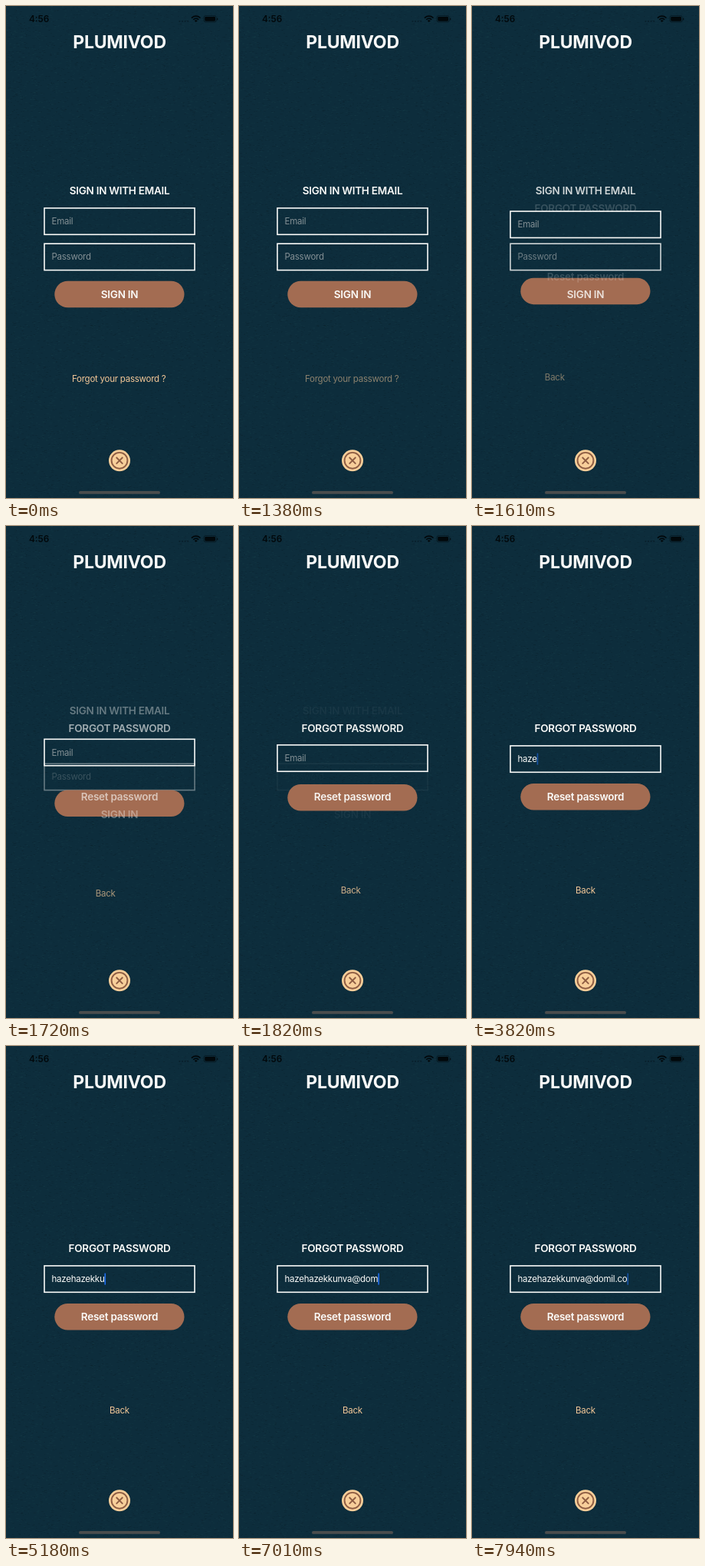
These frames come from a looping animation (296 px wide and 640 px high, 8 s). An HTML page with a canvas:

```html
<!DOCTYPE html>
<html lang="en">
<head>
<meta charset="utf-8">
<title>Password reset</title>
<style>
  html, body { margin: 0; width: 100%; height: 100%; overflow: hidden; background: #0d2d3c; }
  canvas { display: block; width: 100vw; height: 100vh; }
</style>
</head>
<body>
<canvas id="stage"></canvas>
<script>
const W = 296, H = 640, LOOP = 8000;
const canvas = document.getElementById('stage');
const dpr = window.devicePixelRatio || 1;
canvas.width = W * dpr;
canvas.height = H * dpr;
const ctx = canvas.getContext('2d');

const WHITE = '#fbfbf9', GREY = '#849095', PEACH = '#f3c797', BROWN = '#a36c52';
const BODY = { size: 11.5, weight: 400, spacing: -0.25, align: 'left' };
const LABEL = { size: 13.5, weight: 600, spacing: -0.27, align: 'center' };
const TITLE = { size: 23, weight: 700, spacing: -0.2, align: 'center' };
const CLOCK = { size: 11.8, weight: 600, spacing: 0, align: 'left' };

const EMAIL = 'hazehazekkunva@domil.co';
// Moment each character appears.
const KEYS = [3320, 3530, 3680, 3820, 4140, 4290, 4570, 4570, 4900, 5050, 5180, 5330,
  5520, 5740, 6250, 6480, 6760, 7010, 7180, 7370, 7570, 7790, 7940];
// The screen refreshes at these moments while the form changes.
const STEPS = [0, 1380, 1490, 1610, 1720, 1820, 1940];
const FOCUS = 2510;

const background = makeBackground();

function makeBackground() {
  const layer = document.createElement('canvas');
  layer.width = W;
  layer.height = H;
  const g = layer.getContext('2d');
  g.fillStyle = '#0d2d3c';
  g.fillRect(0, 0, W, H);
  let seed = 7;
  const random = () => (seed = (seed * 16807) % 2147483647) / 2147483647;
  for (let i = 0; i < 14000; i++) {
    g.fillStyle = random() < 0.5 ? 'rgba(0,10,18,.1)' : 'rgba(70,110,125,.05)';
    g.fillRect(Math.floor(random() * W), Math.floor(random() * H), 1 + Math.floor(random() * 3), 1);
  }
  return layer;
}

const clamp = v => Math.max(0, Math.min(1, v));
const mix = (a, b, p) => a + (b - a) * p;

// y is the middle of the capital letters.
function text(str, x, y, style, color, alpha = 1) {
  if (alpha <= 0) return 0;
  ctx.globalAlpha = alpha;
  ctx.font = `${style.weight} ${style.size}px Inter, sans-serif`;
  ctx.letterSpacing = style.spacing + 'px';
  ctx.textAlign = style.align;
  ctx.fillStyle = color;
  ctx.fillText(str, x, y + style.size * 0.364);
  ctx.globalAlpha = 1;
  return ctx.measureText(str).width;
}

function pill(x, y, w, h, color) {
  ctx.fillStyle = color;
  ctx.beginPath();
  ctx.roundRect(x, y, w, h, h / 2);
  ctx.fill();
}

function field(y, alpha = 1) {
  if (alpha <= 0) return;
  ctx.globalAlpha = alpha;
  ctx.strokeStyle = WHITE;
  ctx.lineWidth = 1.6;
  ctx.strokeRect(50, y + 0.9, 196, 34.4);
  ctx.globalAlpha = 1;
}

function statusBar() {
  text('4:56', 30, 17, CLOCK, '#02080b');
  ctx.fillStyle = 'rgba(0,8,14,.35)';
  for (let i = 0; i < 4; i++) ctx.fillRect(225.5 + i * 3.6, 19, 1.8, 1.8);

  ctx.strokeStyle = ctx.fillStyle = '#02080b';
  ctx.lineWidth = 1.6;
  for (const r of [4.7, 7.9]) {
    ctx.beginPath();
    ctx.arc(247.7, 21, r, -Math.PI * 0.76, -Math.PI * 0.24);
    ctx.stroke();
  }
  ctx.beginPath();
  ctx.moveTo(247.7, 21);
  ctx.arc(247.7, 21, 2.7, -Math.PI * 0.76, -Math.PI * 0.24);
  ctx.fill();

  ctx.lineWidth = 0.8;
  ctx.strokeStyle = 'rgba(2,8,11,.6)';
  ctx.beginPath();
  ctx.roundRect(257.9, 12.7, 16.4, 8.2, 2.4);
  ctx.stroke();
  ctx.beginPath();
  ctx.roundRect(259.2, 13.9, 13.8, 5.8, 1.4);
  ctx.fill();
  ctx.fillRect(275.3, 15.5, 0.9, 2.8);
}

function closeButton() {
  const x = 148, y = 591.3, arm = 4.3;
  pill(x - 14, y - 14, 28, 28, '#f8cf9a');
  ctx.strokeStyle = '#8e5d43';
  ctx.lineWidth = 1.9;
  ctx.beginPath();
  ctx.arc(x, y, 10.4, 0, Math.PI * 2);
  ctx.stroke();
  ctx.beginPath();
  ctx.moveTo(x - arm, y - arm);
  ctx.lineTo(x + arm, y + arm);
  ctx.moveTo(x + arm, y - arm);
  ctx.lineTo(x - arm, y + arm);
  ctx.stroke();
}

function easeInOut(t) {
  t = clamp(t);
  return t * t * (3 - 2 * t);
}

function emailField(t, p) {
  const y = mix(262, 285, p);
  field(y);
  const typed = EMAIL.slice(0, KEYS.filter(k => k <= t).length);
  const width = text(typed || 'Email', 59.5, y + 18, BODY, typed ? WHITE : GREY);
  if (t < FOCUS) return;
  const fading = (t >= 3820 && t < 4140) || t >= 7940;
  ctx.globalAlpha = fading ? 0.6 : 1;
  ctx.fillStyle = '#1f6ff0';
  ctx.fillRect(59.5 + (typed ? width : 0), 295.6, 1.6, 15);
  ctx.globalAlpha = 1;
}

function link(t, p) {
  if (t < 1490) {
    text('Forgot your password ?', 86, 485, BODY, PEACH, t < 1380 ? 1 : 0.55);
  } else {
    const alpha = clamp(mix(0.3, 1, (t - 1490) / 420));
    text('Back', mix(86, 135, p), mix(485, 473.5, p), BODY, PEACH, alpha);
  }
}

function draw(t) {
  const shown = t < 1940 ? STEPS.filter(s => s <= t).pop() : t;
  const p = easeInOut((shown - 1515) / 350);

  ctx.setTransform(dpr, 0, 0, dpr, 0, 0);
  ctx.drawImage(background, 0, 0);
  statusBar();
  text('PLUMIVOD', 148, 46.8, TITLE, WHITE);

  text('SIGN IN WITH EMAIL', 148, 240, LABEL, WHITE, 1 - p);
  text('FORGOT PASSWORD', 148, 263, LABEL, WHITE, p);
  field(308.3, 1 - p);
  text('Password', 59.5, 326.3, BODY, GREY, 1 - p);
  emailField(t, p);

  pill(63.3, mix(357.8, 335, p), 169.2, 34.5, BROWN);
  text('SIGN IN', 148, 375.3, LABEL, WHITE, 1 - p);
  text('Reset password', 148, 352.2, LABEL, WHITE, p);

  link(shown, p);
  closeButton();
  pill(95, 631, 106, 3.8, '#4b4d4d');
}

function tick() {
  draw(performance.now() % LOOP);
  requestAnimationFrame(tick);
}
tick();
</script>
</body>
</html>
```
